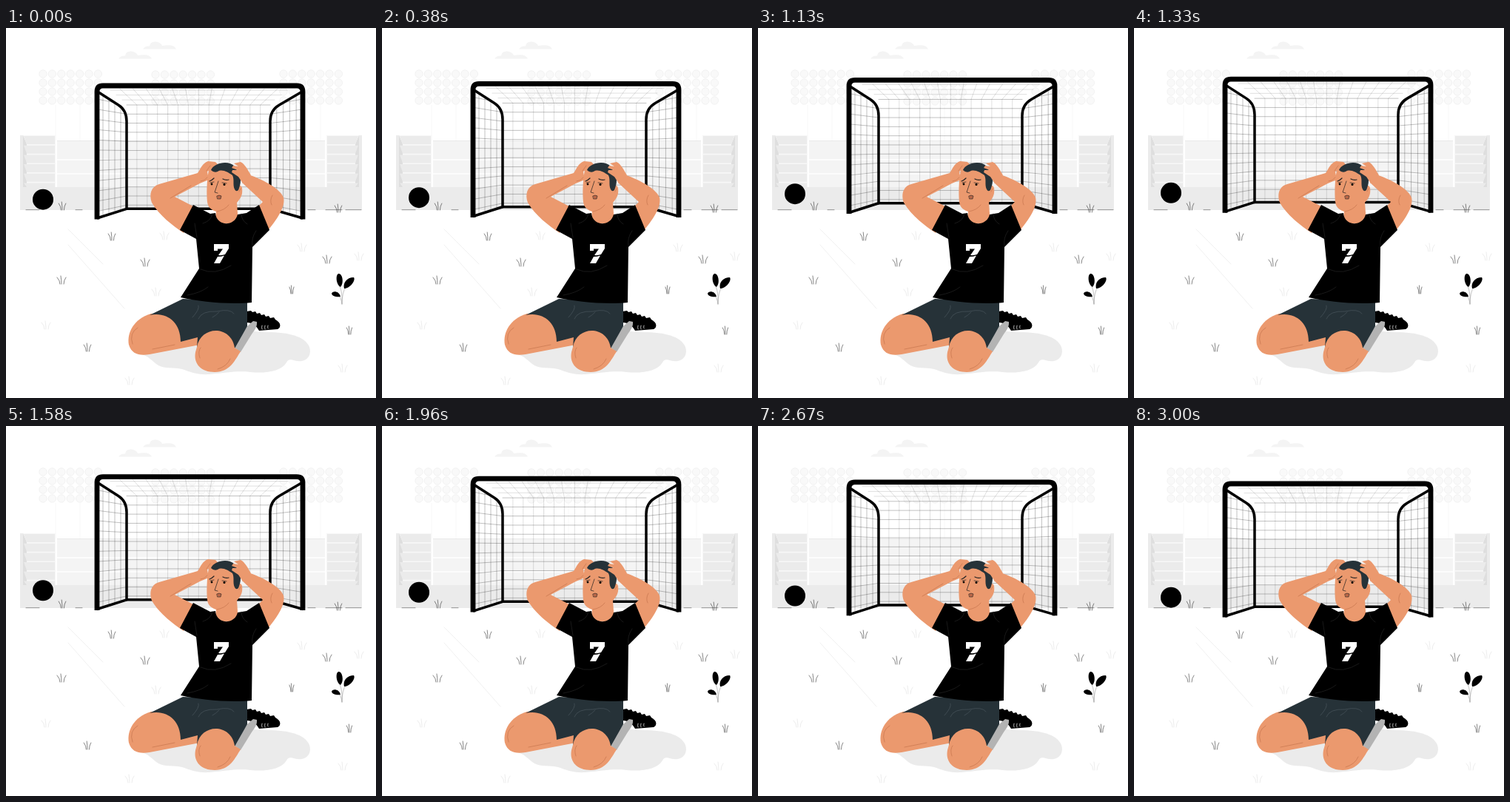
Write an HTML page that moves like this. It is 500 by 500 pixels and loops after 3040 ms.

```html
<!DOCTYPE html>
<html lang="en">
<head>
<meta charset="utf-8">
<style>
html, body { margin: 0; width: 100%; height: 100%; overflow: hidden; background: #fff; }
svg { display: block; width: 100%; height: 100%; }
.line { fill: none; stroke-linecap: round; stroke-linejoin: round; }
</style>
</head>
<body>
<svg viewBox="0 0 500 500">
  <g id="sky" fill="#f4f4f4">
    <path d="M185 28.500Q188 24 194 24.500Q195 18 202 18.500Q209 19 211 24Q227 21 230 28.500Z"/>
    <path d="M152 41.500Q155 37 161 37.500Q162 31 169 31.500Q176 32 178 37Q194 34 197 41.500Z"/>
  </g>
  <g id="lights" fill="#f9f9f9" stroke="#efefef" stroke-width=".8"></g>
  <g id="stands">
    <path fill="#f4f4f4" d="M69 152H431V216H69Z"/>
    <path stroke="#e9e9e9" d="M69 152.500H431"/>
    <path stroke="#fff" stroke-width="1.300" d="M69 178H431M69 197H431"/>
    <path fill="#ebebeb" d="M19 215H481V246H19Z"/>
  </g>
  <g id="ground" class="line"></g>
  <g id="float">
    <g id="net" class="line" stroke="#000" stroke-width=".25"></g>
    <g id="frame" class="line" stroke="#000" style="stroke-linecap:butt"></g>
    <circle cx="50" cy="231.700" r="14"/>
  </g>
  <path fill="#ebebeb" d="M180 440C192 442 198 451 206 456C215 461 228 458 238 461C250 465 258 469 275 468C300 466 310 463 330 465C352 467 372 464 379 452C383 444 390 452 400 450C409 448 413 440 410 431C404 416 380 410 345 411L300 405Z"/>
  <g id="plant">
    <path class="line" stroke="#aaa" stroke-width=".7" d="M454 373Q455 358 451 349M454 373Q454 358 459 350M454 373Q453 364 449 361"/>
    <path d="M452 350C446 347 445 334 449 332C455 331 457 345 452 350ZM457 352C455 345 460 337 470 337C473 341 465 352 457 352ZM452 363C448 364 441 363 440 359C441 355 450 355 452 363Z"/>
  </g>
  <g id="legs">
    <path d="M325 383L331 382L333 384L337 383L339 386L343 385L345 388L349 387L351 390L355 389L357 392L362 391L364 394C372 398 372 405 367 407L342 409C338 402 333 398 325 398Z"/>
    <path class="line" stroke="#fff" stroke-width=".7" d="M346 402Q345 405 346 407M350 402Q349 405 350 407M354 402Q353 405 354 406"/>
    <path fill="#eb996e" d="M196 386C172 393 163 413 166 428C170 441 180 443 194 441L262 428L259 400L238 385Z"/>
    <path fill="#b3b3b3" d="M308 431L326 403L334 396L339 397C340 405 334 410 330 417L317 438Z"/>
    <path fill="#263238" d="M239 366L194 388C217 383 236 397 236 424L259 418L258 432L309 433L326 403V370Z"/>
    <path fill="#eb996e" d="M258 431C263 402 304 401 309 432L317 437C310 448 303 465 282 465C264 465 253 454 256 438Z"/>
    <path class="line" stroke="#56626a" stroke-width=".5" d="M252 391Q262 380 260 375M260 393Q264 382 285 383Q303 379 308 386M288 384Q283 389 279 391"/>
    <path class="line" stroke="#c06f48" stroke-width=".6" d="M171 427Q166 412 178 405M198 434L228 428M262 446Q259 437 263 432M286 461Q299 457 303 447"/>
  </g>
  <g id="body">
    <path fill="#eb996e" d="M255 242L228 228L262 210L274 205L272 194L278 190L286 184L283 181L273 180C265 183 263 190 259 196L207 211C196 214 193 225 197 236C207 253 225 267 240 277Z"/>
    <path fill="#eb996e" d="M340 242L347 235L319 209L330 199C350 206 371 218 375 229C378 241 367 258 352 276Z"/>
    <path fill="#eb996e" d="M274 192C271 208 271 225 272 235C273 243 278 246 284 248L282 264H314L312 236C318 229 320 225 319 216C317 211 314 213 313 215L307 192Q290 182 274 192Z"/>
    <path class="line" stroke="#c06f48" stroke-width=".6" d="M285 248Q296 246 301 239M222 230L250 213M263 207Q268 207 272 202M359 239Q356 233 360 226M315 221L317 217M276 186L271 193"/>
    <path d="M253 239L276 251L283 250C284 268 309 269 313 252L325 250L342 239L356 273L333 296L332 371C302 374 262 370 236 364L261 325L257 285L235 273Z"/>
    <path class="line" stroke="#333" stroke-width=".5" d="M258 283L255 264M333 295Q331 284 338 274M263 326Q282 335 304 321M279 251Q277 261 266 264M318 251Q318 260 326 265M245 361Q263 358 273 350"/>
    <path fill="#fff" d="M281 292H301V298L296 306Q292 307.500 287 307L293 298.500H286V301H281ZM286 309Q291 309 295 307.500L289 318H281Z"/>
  </g>
  <g id="head">
    <path fill="#263238" d="M277 192C281 182 301 178 309 187L315 197C319 205 316 214 314 219Q311 222 309 218C306 212 309 205 306 199C300 195 292 190 286 194Q281 196 277 192Z"/>
    <path fill="#eb996e" d="M308 183L317 181C323 184 327 192 331 199L320 210L314 201L305 195L306 192L313 192L305 189L307 186L314 187Z"/>
    <g class="line" stroke="#222">
      <path d="M275 207Q278 206 281 203M293 204Q297 206 301 205" stroke-width="1.200"/>
      <path d="M287 207L282 222L286 223M276 209L281 208M292 209L298 210" stroke-width=".7"/>
      <path d="M285 227Q288 225 291 227L290 231H286Z" stroke-width=".6" fill="#b96748"/>
    </g>
    <circle cx="278" cy="211" r="1.400"/><circle cx="295" cy="211.500" r="1.500"/>
  </g>
</svg>
<script>
const LOOP = 3040, FLOAT = 3000, RISE = 10;
const $ = id => document.getElementById(id);
const range = n => Array.from({ length: n }, (_, i) => i);

function add(parent, tag, attrs) {
  const el = document.createElementNS('http://www.w3.org/2000/svg', tag);
  for (const key in attrs) el.setAttribute(key, attrs[key]);
  parent.append(el);
  return el;
}
const path = (parent, d, attrs) => add(parent, 'path', { d, ...attrs });

function floodlight(x, y) {
  for (const pole of [17, 50]) path($('lights'), `M${x + pole} ${y + 42}V152`, { stroke: '#f7f7f7' });
  for (const row of range(4)) for (const col of range(7))
    add($('lights'), 'circle', { cx: x + col * 12.4, cy: y + row * 12, r: 5.2 });
}

function sideStand(x, flip) {
  const g = add($('stands'), 'g', { transform: `translate(${x} 0) scale(${flip} 1)` });
  path(g, 'M0 145H48V215H0Z', { fill: '#f7f7f7' });
  path(g, 'M0 145H4V246H0Z', { fill: '#ebebeb' });
  path(g, 'M4 145L9 157V215H4Z', { fill: '#dedede' });
  for (const i of range(6)) {
    const y = 146 + i * 12.7;
    path(g, `M5 ${y}H47V${Math.min(y + 11, 215)}H9Z`, { fill: '#ebebeb' });
  }
}

function grass(x, y, color, size = 1) {
  const blade = (top, height, foot) =>
    `M${x + top * size} ${y - height}Q${x + foot * size} ${y} ${x + foot * size} ${y + 5}`;
  path($('ground'), blade(-6, 4, -2) + blade(-1, 6, 0) + blade(6, 4, 3), { stroke: color, 'stroke-width': .55 });
}

// One side of the goal: front post at x = a, rear post at x = b.
function goalSide(a, b) {
  const at = k => a + (b - a) * k;
  const rear = `M${a} 85.5L${at(.72)} 104Q${b} 111 ${b} 126V244.3L${a} 257`;
  const clip = add($('net'), 'clipPath', { id: 'side' + a });
  path(clip, rear + 'Z');
  const mesh = add($('net'), 'g', { 'clip-path': `url(#side${a})` });
  for (const k of [.2, .4, .6, .8]) path(mesh, `M${at(k)} 82V257`);
  for (const i of range(12)) path(mesh, `M${a} ${96 + i * 13.8}L${b} ${104 + i * 12.3}`);
  path($('frame'), rear, { 'stroke-width': 3.5 });
}

function goal() {
  for (const i of range(13)) {
    const x = 163 + (i + 1) * 13.9;
    path($('net'), `M${260 + (x - 260) * 1.28} 82L${x} 104V244`, { opacity: .5 });
  }
  for (const i of range(12)) path($('net'), `M163 ${104 + i * 12.3}H357`);
  for (const i of range(3)) path($('net'), `M${141 + i * 8} ${84 + i * 6.6}H${381 - i * 9}`, { opacity: .5 });
  goalSide(123, 163);
  goalSide(401, 357);
  path($('frame'), 'M162 244.3H358', { 'stroke-width': 3.5 });
  path($('frame'), 'M123 258.5V86Q123 78 131 78H393Q401 78 401 86V258.5', { 'stroke-width': 6.8 });
}

floodlight(50, 62);
floodlight(202, 63);
floodlight(375, 62);
sideStand(19, 1);
sideStand(481, -1);
path($('ground'), 'M27 245.7H45M94 245.7H103M408 245.7H418M432 245.7H454M459 245.7H480', { stroke: '#333', 'stroke-width': .5 });
path($('ground'), 'M84 272L131 319M84 293L160 379', { stroke: '#e6e6e6', 'stroke-width': .6 });
for (const [x, y, size] of [[76, 241, .8], [143, 282, .8], [75, 341], [188, 317], [110, 432, .8], [434, 313], [386, 354, .5], [464, 409, .6], [449, 244, .8]])
  grass(x, y, '#222', size);
for (const [x, y] of [[54, 402], [203, 357], [214, 281], [400, 297], [477, 309], [455, 460], [167, 477]])
  grass(x, y, '#ddd');
goal();

function draw(ms) {
  const phase = (ms % LOOP % FLOAT) / FLOAT;
  const lift = RISE * (1 - Math.abs(1 - 2 * phase));
  $('float').setAttribute('transform', `translate(0 ${-lift})`);
}

const start = performance.now();
function tick() {
  draw(performance.now() - start);
  requestAnimationFrame(tick);
}
tick();
</script>
</body>
</html>
```
